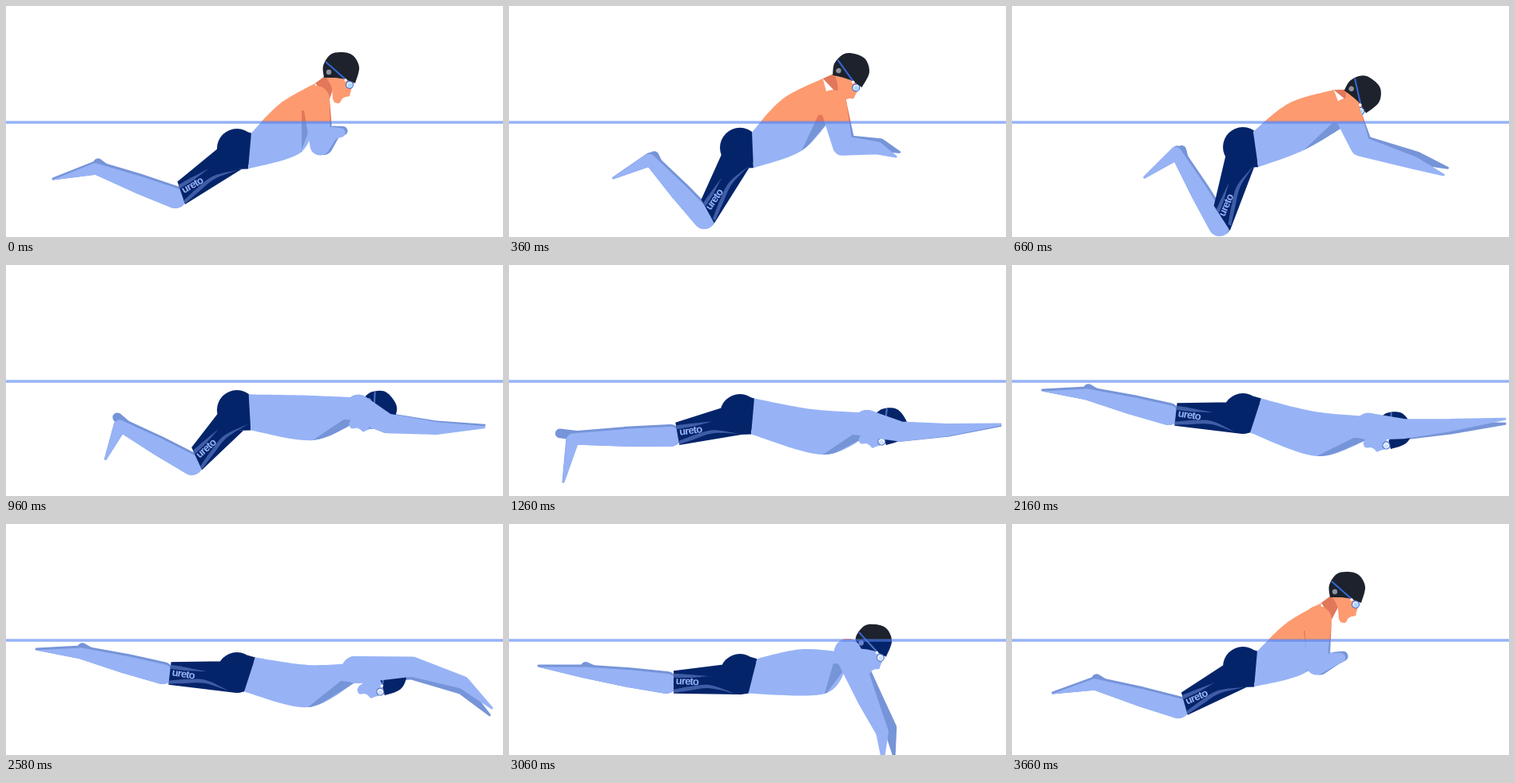
An HTML page with a canvas for the animation above (3.72 s loop, 622x290 px).

```html
<!DOCTYPE html>
<html lang="en">
<head>
<meta charset="utf-8">
<title>Breaststroke</title>
<style>
html, body { margin: 0; width: 100%; height: 100%; overflow: hidden; background: #fff; }
canvas { display: block; }
</style>
</head>
<body>
<canvas id="stage" width="622" height="290"></canvas>
<script>
const ctx = document.getElementById('stage').getContext('2d');
const LOOP = 3720, STEP = 60, WATER = 146, WAIST_X = 305, RAD = Math.PI / 180;

const AIR = { skin: '#fd9a70', shade: '#e2775a', cap: '#1d222c', strap: '#3667d6', badge: '#8d939c', lens: '#a9d6fa' };
const SEA = { skin: '#97b3f6', shade: '#7694d8', cap: '#04246a', strap: '#5273c4', badge: '#6d88cc', lens: '#cfe0ff' };
const NAVY = '#04246a', STRIPE = '#3f5da6';

// Joints of the rig at the main moments of the stroke.
// head: x, y, degrees; waist: y, degrees; arch: bend of the back;
// lag: degrees the far arm trails; spread: how far the far foot shows
const tracks = {};
function pose(t, joints) {
  for (const name in joints) (tracks[name] ||= []).push([t, joints[name]]);
}

const kick = { head: [477, 202, 55], arch: [-4], chest: [393, 238], shoulder: [448, 199], elbow: [490, 209], wrist: [548, 207], hand: [615, 200], lag: [.5] };
const glide = { head: [479, 207, 55], arch: [-5], chest: [382, 240], shoulder: [446, 203], elbow: [490, 206], wrist: [548, 201], hand: [617, 193], lag: [2] };
const trail = { waist: [189, 18], knee: [196, 187], ankle: [94, 161], toe: [38, 157], spread: [0] };

pose(0, {
  head: [420, 79, 0], arch: [7], chest: [370, 183], shoulder: [388, 117], elbow: [393, 175], wrist: [408, 160], hand: [419, 159], lag: [-4],
  waist: [182, 5], knee: [212, 240], ankle: [113, 203], toe: [59, 217], spread: [0],
});
pose(180, { head: [423, 77, 2] });
pose(540, { head: [436, 90, 28] });
pose(660, {
  head: [440, 110, 36], arch: [11], chest: [365, 181], shoulder: [419, 133], elbow: [436, 176], wrist: [503, 197], hand: [540, 212], lag: [-4],
  waist: [180, -8], knee: [260, 275], ankle: [207, 184], toe: [166, 215], spread: [0],
});
pose(1140, kick);
pose(1260, { ...kick, waist: [190, 5], knee: [202, 214], ankle: [80, 217], toe: [68, 272], spread: [16] });
pose(1740, { ...glide, waist: [188, 18], knee: [196, 189], ankle: [86, 180], toe: [33, 203], spread: [0] });
pose(2130, { ...glide, ...trail });
pose(2580, {
  ...trail,
  head: [479, 191, 55], arch: [-6], chest: [378, 230], shoulder: [437, 183], elbow: [508, 179], wrist: [572, 199], hand: [608, 231], lag: [3],
});
pose(3060, {
  head: [457, 147, 6], arch: [8], chest: [395, 213], shoulder: [424, 161], elbow: [448, 219], wrist: [467, 261], hand: [468, 298], lag: [-6],
  waist: [191, 14], knee: [197, 199], ankle: [95, 185], toe: [37, 178], spread: [0],
});
pose(3240, { head: [442, 119, 3] });
pose(3660, {
  head: [420, 81, 0], arch: [6], chest: [371, 184], shoulder: [383, 120], elbow: [381, 177], wrist: [402, 170], hand: [411, 168], lag: [-4],
  waist: [182, 5], knee: [208, 230], ankle: [104, 200], toe: [51, 212], spread: [0],
});

// Monotone cubic through the looping keys
function sample(name, t) {
  const keys = tracks[name], n = keys.length;
  const at = k => keys[(k + n) % n];
  const time = k => at(k)[0] + LOOP * Math.floor(k / n);
  let i = n - 1;
  while (keys[i][0] > t) i--;
  const span = time(i + 1) - time(i), u = (t - time(i)) / span;
  return keys[i][1].map((a, c) => {
    const slope = k => (at(k + 1)[1][c] - at(k)[1][c]) / (time(k + 1) - time(k));
    const tangent = k => {
      const p = slope(k - 1), q = slope(k);
      return p * q <= 0 ? 0 : 2 * p * q / (p + q);
    };
    const d = at(i + 1)[1][c] - a;
    return a + d * u * u * (3 - 2 * u)
      + span * u * (1 - u) * (tangent(i) * (1 - u) - tangent(i + 1) * u);
  });
}

// Vector helpers
const add = (p, q, s = 1) => [p[0] + q[0] * s, p[1] + q[1] * s];
const mix = (p, q, s) => add(p, add(q, p, -1), s);
const angle = (p, q) => Math.atan2(q[1] - p[1], q[0] - p[0]);
const polar = (a, r = 1) => [Math.cos(a) * r, Math.sin(a) * r];
const upFrom = a => polar(a - Math.PI / 2);
const dist = (p, q) => Math.hypot(q[0] - p[0], q[1] - p[1]);

// Closed outline of smooth edges with corners between them
function outline(...edges) {
  const path = new Path2D();
  edges.forEach((e, i) => {
    const pt = k => e[Math.max(0, Math.min(e.length - 1, k))];
    const handle = (k, s) => add(pt(k), add(pt(k + 1), pt(k - 1), -1), s / 6);
    path[i ? 'lineTo' : 'moveTo'](...e[0]);
    for (let k = 0; k < e.length - 1; k++) {
      path.bezierCurveTo(...handle(k, 1), ...handle(k + 1, -1), ...pt(k + 1));
    }
  });
  path.closePath();
  return path;
}

const polygon = (...points) => outline(...points.map(p => [p]));

// Chain of tapered round segments
function limb(joints, radii) {
  const path = new Path2D();
  for (let i = 0; i < joints.length - 1; i++) {
    const a = joints[i], b = joints[i + 1], turn = angle(a, b);
    const ratio = (radii[i] - radii[i + 1]) / Math.max(dist(a, b), .01);
    const side = Math.acos(Math.max(-1, Math.min(1, ratio)));
    const part = new Path2D();
    part.arc(...a, radii[i], turn + side, turn - side + 2 * Math.PI);
    part.arc(...b, radii[i + 1], turn - side, turn + side);
    part.closePath();
    path.addPath(part);
  }
  return path;
}

function fill(path, color) {
  ctx.fillStyle = color;
  ctx.fill(path);
}

function dot(x, y, r, color) {
  ctx.fillStyle = color;
  ctx.beginPath();
  ctx.arc(x, y, r, 0, 2 * Math.PI);
  ctx.fill();
}

function clipped(path, draw) {
  ctx.save();
  ctx.clip(path);
  draw();
  ctx.restore();
}

function place(p, a, draw) {
  ctx.save();
  ctx.translate(...p);
  ctx.rotate(a);
  draw();
  ctx.restore();
}

const FACE = outline([[-21, 8], [-13, 22], [-11, 38]], [[-9, 42], [-3, 43], [1, 37]], [[5, 35], [10, 34], [11, 30], [16, 14]]);
const CAP = outline([[-22, 11], [-23, -4], [-14, -18], [0, -21], [14, -17], [22, -2], [17, 18]], [[17, 18], [0, 12], [-22, 11]]);
const STRIPES = [
  outline([[-18, -9], [0, -9], [29, -8]], [[29, -8], [5, -5], [-18, -4]]),
  outline([[-20, 12], [5, 6], [30, 3], [61, 12]], [[61, 12], [30, 7], [5, 11], [-20, 16]]),
];

function drawHead(pal) {
  fill(FACE, pal.skin);
  fill(CAP, pal.cap);
  dot(-16, 4, 3.2, pal.badge);
  ctx.strokeStyle = pal.strap;
  ctx.lineWidth = 2;
  ctx.beginPath();
  ctx.moveTo(-20, -9);
  ctx.lineTo(6, 14);
  ctx.stroke();
  dot(5, 14, 1.8, '#fff');
  dot(10, 20, 5, pal.strap);
  dot(10, 20, 3.8, '#fff');
  dot(10.5, 20.5, 3, pal.lens);
}

function drawLeg({ knee, ankle, toe, spread }, pal) {
  const shin = angle(ankle, knee);
  const shape = limb([knee, mix(knee, ankle, .45), ankle, toe], [14, 12.5, 8.5, 1.5]);
  const farToe = add(ankle, polar(shin), -spread[0]);
  fill(limb([mix(ankle, knee, .2), add(farToe, upFrom(shin), 6)], [6, 6]), pal.shade);
  fill(shape, pal.shade);
  clipped(shape, () => {
    ctx.translate(...add([0, 0], upFrom(shin), -3));
    fill(shape, pal.skin);
  });
}

function drawShorts({ knee, ankle }, hip, top, bottom) {
  const thigh = angle(knee, hip), shin = angle(ankle, knee);
  const hemTurn = thigh * .7 + shin * .3;
  const hem = add(knee, polar(thigh), 9);
  const hemHalf = add([0, 0], upFrom(hemTurn), 14.3 / Math.cos(thigh - hemTurn));
  const up = upFrom(thigh), seat = add(hip, [0, -6]);
  const shape = limb([seat, seat], [25, 25]);
  shape.addPath(limb([hip, hip], [20, 20]));
  shape.addPath(polygon(add(hem, hemHalf), add(hip, up, 20), add(hip, up, -20), add(hem, hemHalf, -1)));
  shape.addPath(polygon(add(seat, [0, -25]), top, bottom, add(hip, [0, 20])));
  fill(shape, NAVY);
  clipped(shape, () => place(add(hem, polar(thigh), 16), thigh + 6 * RAD, () => {
    STRIPES.forEach(s => fill(s, STRIPE));
    ctx.fillStyle = '#97b3f6';
    ctx.font = 'bold 13px "Liberation Sans", Arial, sans-serif';
    ctx.letterSpacing = '-0.8px';
    ctx.textAlign = 'center';
    ctx.fillText('ureto', 1, 4);
  }));
}

function drawSwimmer(rig, pal) {
  const { head, arch, chest, shoulder, elbow, wrist, hand, lag } = rig;
  const waist = [WAIST_X, rig.waist[0]], up = upFrom(rig.waist[1] * RAD);
  const top = add(waist, up, 22.5), bottom = add(waist, up, -22.5);
  const tilt = head[2] * RAD;
  const onHead = (x, y) => add(head, add(polar(tilt, x), upFrom(tilt), -y));
  const neck = onHead(-33, 18);
  const back = add(mix(top, neck, .5), upFrom(angle(top, neck)), arch[0]);
  const armpit = add(shoulder, [-18, 14]), chestTop = add(shoulder, [0, 16]);

  // A short hand is a fist, a long one tapers to the fingertips
  const fist = Math.max(1.5, 9 - .3 * dist(wrist, hand));
  const arm = limb([shoulder, elbow, wrist, hand], [17, 12.5, 8, fist]);
  const torso = outline([top, back, neck], [chestTop, chest, bottom]);

  place(shoulder, lag[0] * RAD, () => {
    ctx.translate(-shoulder[0], -shoulder[1]);
    fill(arm, pal.shade);
  });
  drawLeg(rig, pal);
  drawShorts(rig, add(waist, [-16, 3]), top, bottom);
  fill(polygon(neck, onHead(-21, 9), onHead(-8, 16), add(shoulder, [17, 0])), pal.shade);
  fill(torso, pal.skin);
  clipped(torso, () => fill(outline([chest, armpit], [chestTop, add(chest, [-4, 8])]), pal.shade));
  place(head, tilt, () => drawHead(pal));
  fill(arm, pal.skin);
}

function layer(rig, pal, y, h) {
  const band = new Path2D();
  band.rect(0, y, 622, h);
  clipped(band, () => drawSwimmer(rig, pal));
}

function render(t) {
  const rig = {};
  for (const name in tracks) rig[name] = sample(name, t);
  ctx.fillStyle = '#fff';
  ctx.fillRect(0, 0, 622, 290);
  layer(rig, AIR, 0, WATER);
  layer(rig, SEA, WATER, 290 - WATER);
  ctx.fillStyle = 'rgba(82, 128, 240, .6)';
  ctx.fillRect(0, 144.3, 622, 3.5);
}

const start = performance.now();
function tick() {
  const t = (performance.now() - start) % LOOP;
  render(Math.floor(t / STEP) * STEP);
  requestAnimationFrame(tick);
}
tick();
</script>
</body>
</html>
```
